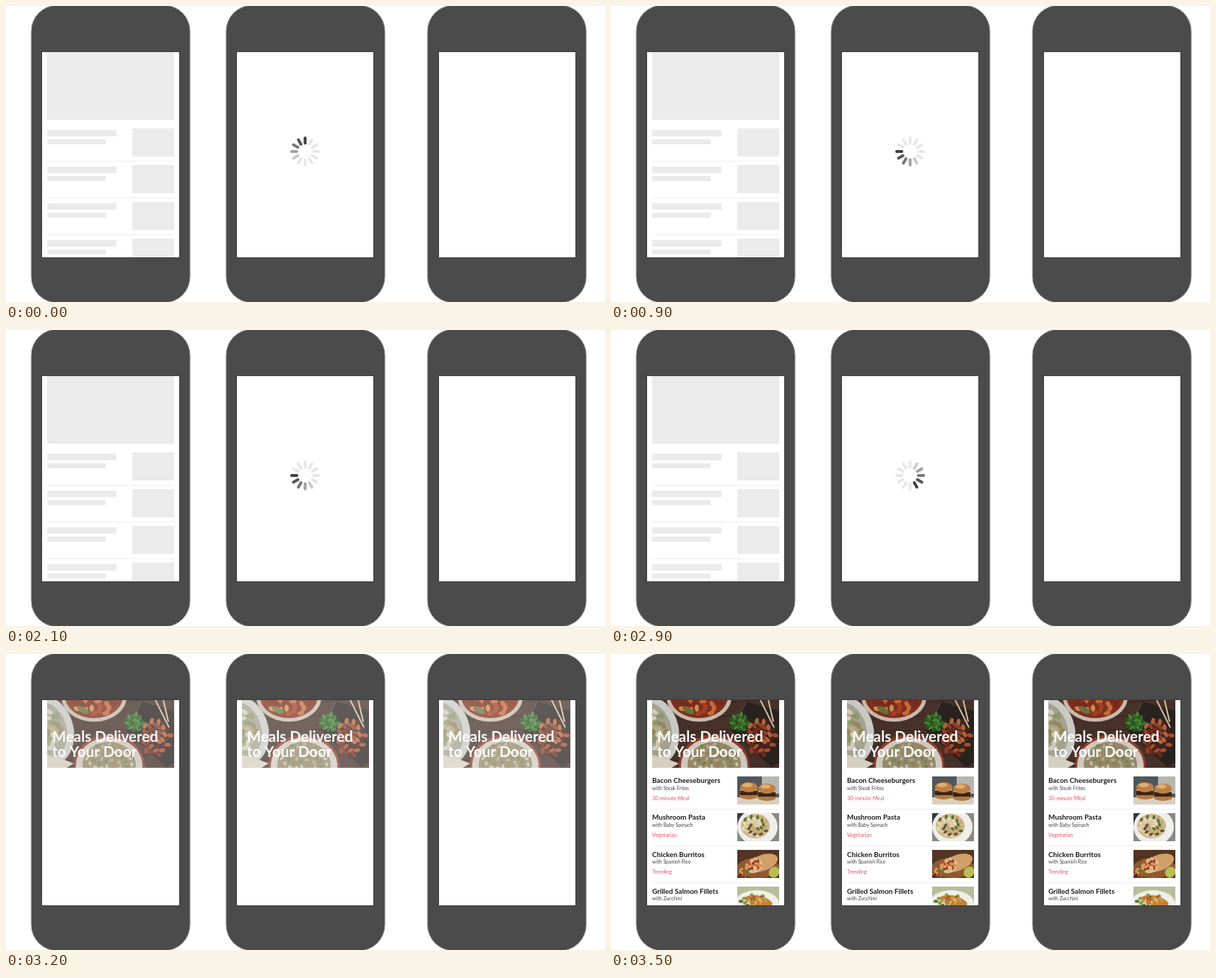
Animation of 830 by 411 pixels, one loop 8.5 s. Source, as an HTML page with a canvas:

```html
<!DOCTYPE html>
<html lang="en">
<head>
<meta charset="utf-8">
<title>Loading styles</title>
<style>
  html, body { margin: 0; width: 100%; height: 100%; overflow: hidden; background: #fff; }
  canvas { display: block; width: 830px; height: 411px; }
</style>
</head>
<body>
<canvas id="stage" width="830" height="411"></canvas>
<script>
const ctx = document.getElementById('stage').getContext('2d');
const LOOP = 8500, STEP = 100, REVEAL = 30;
const SKELETON = '#ebebeb', ROW_GAP = 51.1;
const phones = [
  { x: 0, left: 50, right: 240, loader: 'skeleton' },
  { x: 270, left: 320, right: 509, loader: 'spinner' },
  { x: 549, left: 600, right: 789, loader: 'none' }
];
const meals = [
  ['Bacon Cheeseburgers', 'with Steak Frites', '30-minute Meal', burgers],
  ['Mushroom Pasta', 'with Baby Spinach', 'Vegetarian', pasta],
  ['Chicken Burritos', 'with Spanish Rice', 'Trending', burrito],
  ['Grilled Salmon Fillets', 'with Zucchini', '', salmon]
];
const clamp = v => Math.max(0, Math.min(1, v));

function rect(x, y, w, h, color) {
  ctx.fillStyle = color;
  ctx.fillRect(x, y, w, h);
}

function oval(x, y, rx, ry, color, turn = 0) {
  ctx.fillStyle = color;
  ctx.beginPath();
  ctx.ellipse(x, y, rx, ry, turn, 0, Math.PI * 2);
  ctx.fill();
}

function poly(color, ...points) {
  ctx.fillStyle = color;
  ctx.beginPath();
  points.forEach(([x, y]) => ctx.lineTo(x, y));
  ctx.fill();
}

function line(x1, y1, x2, y2, width, color) {
  ctx.strokeStyle = color;
  ctx.lineWidth = width;
  ctx.beginPath();
  ctx.moveTo(x1, y1);
  ctx.lineTo(x2, y2);
  ctx.stroke();
}

function text(str, x, y, font, color) {
  ctx.font = font + ' Lato, "Open Sans", sans-serif';
  ctx.fillStyle = color;
  ctx.fillText(str, x, y);
}

function clipped(x, y, w, h, paint) {
  ctx.save();
  ctx.beginPath();
  ctx.rect(x, y, w, h);
  ctx.clip();
  paint();
  ctx.restore();
}

// Covers an area so that only the given share of it shows through.
function veil(x, y, w, h, color, shown) {
  ctx.globalAlpha = 1 - shown;
  rect(x, y, w, h, color);
  ctx.globalAlpha = 1;
}

// Small overlapping ovals spread evenly over an elliptical area.
function pieces(cx, cy, rx, ry, count, size, colors) {
  for (let i = 0; i < count; i++) {
    const r = Math.sqrt((i + 0.5) / count), a = i * 2.4;
    oval(cx + Math.cos(a) * r * rx, cy + Math.sin(a) * r * ry,
      size, size * 0.6, colors[i * 7 % colors.length], i * 1.3);
  }
}

function heroPhoto() {
  rect(57, 64, 176, 94, '#46312a');
  for (let i = 0; i < 6; i++) line(57, 74 + i * 19, 233, 62 + i * 19, 1, '#35231e');

  oval(58, 107, 36, 48, '#c9c9c4', -0.2);
  oval(55, 107, 29, 40, '#a3a191', -0.2);
  pieces(62, 104, 14, 28, 22, 5, ['#b9ae82', '#d1cdb9', '#8d9668', '#96875c']);
  poly('#d6cfbd', [57, 140], [76, 145], [94, 152], [84, 158], [57, 158]);

  oval(122, 60, 45, 34, '#c8b9aa');
  oval(122, 59, 40, 30, '#7d301d');
  pieces(123, 66, 32, 19, 26, 5, ['#c76a36', '#a73d24', '#c98e52', '#78291b']);
  oval(107, 78, 9, 4, '#66733a', 0.5);

  oval(143, 155, 49, 43, '#8a3d2e');
  oval(143, 155, 46, 39, '#cfc8bd');
  oval(143, 154, 37, 32, '#93886a');
  pieces(143, 147, 33, 24, 44, 3, ['#b8ab84', '#8a8259', '#cdc3a4', '#76834e']);

  poly('#29231f', [187, 66], [233, 79], [233, 151], [222, 157], [166, 106]);
  line(187, 67, 168, 105, 1, '#685a50');
  pieces(208, 115, 20, 26, 36, 4.5, ['#8f3e25', '#b4623c', '#4d2118', '#a64d2d', '#6e2a1d']);
  pieces(178, 95, 13, 12, 26, 3.5, ['#376d2b', '#24551f', '#4c8434']);
  line(207, 64, 226, 102, 2, '#d4bea4');
  line(218, 64, 225, 94, 2, '#d4bea4');
}

function hero() {
  clipped(57, 64, 176, 94, heroPhoto);
  text('Meals Delivered', 64, 122, 'bold 20.4px', '#fff');
  text('to Your Door', 64, 142.5, 'bold 20.4px', '#fff');
}

// The food pictures below fill a 58 by 39 area.
function burgers() {
  rect(0, 0, 58, 39, '#50575a');
  rect(34, 0, 24, 24, '#b6b6b0');
  rect(0, 29, 58, 10, '#d9cfbf');
  for (const [x, y] of [[16, 17], [41, 19]]) {
    oval(x, y + 10, 13, 5, '#b27a42');
    rect(x - 12, y + 3, 24, 6, '#3b2419');
    rect(x - 12, y + 1, 24, 2, '#d2a044');
    oval(x, y - 2, 12, 7, '#bd7f43');
    oval(x - 2, y - 5, 7, 3, '#dfae73');
  }
}

function pasta() {
  rect(0, 0, 58, 39, '#8b8883');
  poly('#343a3b', [0, 0], [14, 0], [0, 18]);
  oval(28, 19, 28, 25, '#eeeeea');
  oval(25, 18, 20, 17, '#cbb98c');
  pieces(25, 18, 18, 15, 34, 3, ['#e9dcb8', '#596b34', '#c5a56d', '#665039', '#dfcfa3']);
}

function burrito() {
  rect(0, 0, 58, 39, '#513422');
  oval(29, 25, 30, 14, '#8b5a33');
  oval(35, 18, 22, 11, '#d0a069', -0.35);
  oval(23, 22, 12, 10, '#e6c28c', -0.4);
  pieces(22, 21, 11, 9, 24, 2.5, ['#b84a2b', '#e0b27b', '#833523', '#d98b4d']);
  pieces(9, 31, 9, 6, 12, 2.5, ['#b65431', '#d6a363', '#6e752e']);
  oval(51, 31, 7, 8, '#b9bd52', 0.6);
}

function salmon() {
  rect(0, 0, 58, 39, '#b8bc9a');
  oval(27, 24, 31, 19, '#efeee8');
  pieces(23, 20, 19, 9, 20, 3.5, ['#8a9848', '#c8ba72', '#63752f']);
  oval(30, 20, 19, 7, '#c08238', 0.25);
  pieces(28, 18, 14, 5, 12, 2.5, ['#e1b875', '#9a5d2a', '#d39a4c']);
}

function mealList() {
  meals.forEach(([title, side, tag, picture], i) => {
    const y = i * ROW_GAP;
    text(title, 57, 179.3 + y, 'bold 9.8px', '#1c1c1c');
    text(side, 57, 189 + y, '7px', '#444');
    text(tag, 57, 203 + y, '7.3px', '#ef4f5d');
    const top = Math.round(170 + y);
    clipped(175, top, 58, 39, () => {
      ctx.translate(175, top);
      picture();
    });
  });
  dividers();
}

function dividers() {
  for (let i = 0; i < 3; i++) rect(57, Math.round(214.5 + i * ROW_GAP), 176, 1, '#efefef');
}

function skeleton() {
  rect(57, 64, 176, 94, SKELETON);
  for (let i = 0; i < 4; i++) {
    const y = Math.round(i * ROW_GAP);
    rect(57, 172 + y, 96, 9, SKELETON);
    rect(57, 185 + y, 81, 7, SKELETON);
    rect(175, 170 + y, 58, 39, SKELETON);
  }
  dividers();
}

function spinner(step) {
  const trail = [64, 85, 120, 160, 202];
  ctx.lineCap = 'round';
  for (let i = 0; i < 12; i++) {
    const shade = trail[(step - i + 120) % 12] ?? 231;
    const a = i * Math.PI / 6, sin = Math.sin(a), cos = Math.cos(a);
    line(144.5 + sin * 11.5, 202 - cos * 11.5, 144.5 + sin * 18.7, 202 - cos * 18.7,
      4, `rgb(${shade},${shade},${shade})`);
  }
  ctx.lineCap = 'butt';
}

function body(phone) {
  ctx.beginPath();
  ctx.roundRect(phone.x + 35, -1, 220, 413, 36);
  ctx.fillStyle = '#4b4b4b';
  ctx.fill();
  ctx.strokeStyle = '#999';
  ctx.lineWidth = 1;
  ctx.stroke();
  const width = phone.right - phone.left;
  rect(phone.left - 1, 63, width + 2, 287, '#3b3b3b');
  rect(phone.left, 64, width, 285, '#fff');
}

function screen(phone, step) {
  ctx.translate(phone.x, 0);
  if (step < REVEAL) {
    if (phone.loader === 'skeleton') skeleton();
    if (phone.loader === 'spinner') spinner(step);
    return;
  }
  const heroShown = clamp((step - REVEAL + 1) * 0.25);
  const listShown = clamp((step - REVEAL - 2) * 0.35);
  hero();
  veil(57, 64, 176, 94, phone.loader === 'skeleton' ? SKELETON : '#fff', heroShown);
  if (listShown > 0) {
    mealList();
    veil(57, 160, 176, 189, '#fff', listShown);
  }
}

function draw() {
  const step = Math.floor(performance.now() % LOOP / STEP);
  rect(0, 0, 830, 411, '#fff');
  for (const phone of phones) {
    body(phone);
    clipped(phone.left, 64, phone.right - phone.left, 285, () => screen(phone, step));
  }
  requestAnimationFrame(draw);
}

draw();
</script>
</body>
</html>
```
